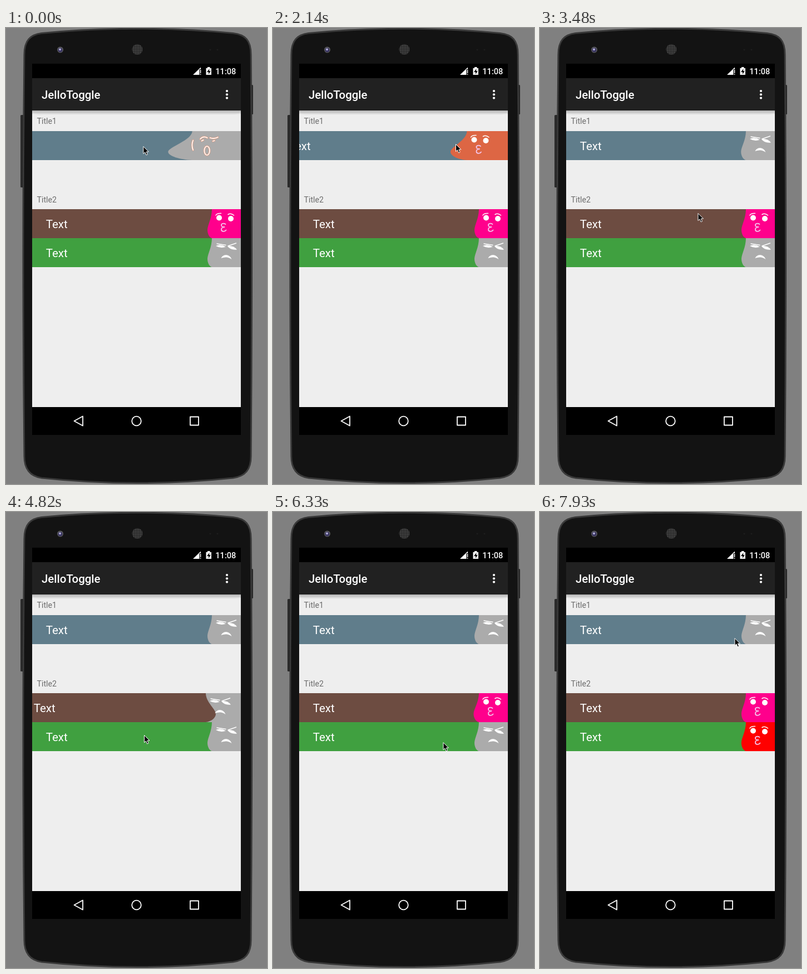
An HTML page for the animation above (8 s loop, 469 by 818 pixels).

```html
<!DOCTYPE html>
<html lang="en">
<head>
<meta charset="utf-8">
<title>JelloToggle</title>
<style>
  html, body { margin: 0; width: 100%; height: 100%; overflow: hidden; background: #808080; }
  svg { display: block; width: 469px; height: 818px; font-family: Roboto, sans-serif; }
  .label { font-size: 14.2px; fill: #6c6c6c; }
  .line { fill: none; stroke: #fff; stroke-linecap: round; stroke-linejoin: round; }
</style>
</head>
<body>
<svg viewBox="0 0 469 818">
  <defs>
    <linearGradient id="shade" x2="0" y2="1">
      <stop offset="0" stop-color="#b8b8b8"/>
      <stop offset=".6" stop-color="#cecece"/>
      <stop offset="1" stop-color="#eee"/>
    </linearGradient>
    <pattern id="mesh" width="3" height="3" patternUnits="userSpaceOnUse">
      <rect width="3" height="3" fill="#222"/>
      <circle cx="1.5" cy="1.5" r="1" fill="#5a5a5a"/>
    </pattern>
    <clipPath id="screen"><rect x="47" y="64" width="375" height="666"/></clipPath>

    <g id="kiss">
      <g fill="#fff">
        <circle cx="383" cy="15.5" r="5"/>
        <circle cx="404" cy="17" r="5"/>
      </g>
      <g class="line" stroke-width="1.5">
        <path d="M377 11Q379 7 386.500 7.500"/>
        <path d="M399 9.500Q404 6.500 409.500 11"/>
      </g>
      <path class="line" stroke="#f3c6ee" style="stroke:#f3c6ee" stroke-width="1.800" d="M394.500 27C391 24.500 386.500 26 387 29C387.300 31.500 390 32 392.500 32C389 32 386.500 34 387 37C387.500 40.500 393 41 395.500 37.500"/>
    </g>
    <g id="angry">
      <g fill="#fff">
        <path d="M377 14Q385 10 395 15.500Q386 19 377 14Z"/>
        <path d="M398 14.500Q408 12.500 415 20.500Q404 22 398 14.500Z"/>
        <path d="M386.500 36C390 28 402 28 405.500 38C399 33 394 33.500 386.500 36Z"/>
      </g>
      <g class="line" stroke-width="1.400">
        <path d="M379 10L395 12.500"/>
        <path d="M399 14L413.500 9"/>
      </g>
    </g>
    <g id="shockLines">
      <path d="M371.500 16.500Q368 25 371.500 34"/>
      <path d="M384.500 14Q390 8 397 12M387 17.500L390 16"/>
      <path d="M402 12Q409 14.500 416 11M407 18L410 17"/>
      <ellipse cx="396.500" cy="35" rx="4.800" ry="8"/>
    </g>
    <g id="shock" fill="none" stroke-linecap="round">
      <use href="#shockLines" stroke="#e59a7c" stroke-width="3.200"/>
      <use href="#shockLines" stroke="#fff" stroke-width="1.700"/>
    </g>
    <path id="body" d="M33 48C33 22 44 12 64 9.500Q236 -7 408 9.500C430 12 440 22 440 48Q443 410 440 768C440 792 430 804 408 807Q236 825 64 807C44 804 33 792 33 768Q29 410 33 48Z"/>
  </defs>

  <rect width="469" height="818" fill="#808080"/>
  <g fill="#2b2b2b">
    <rect x="26" y="156" width="7" height="130" rx="1.500"/>
    <rect x="437" y="102" width="7" height="53" rx="1.500"/>
  </g>
  <use href="#body" fill="#131313" stroke="#2b2b2b" stroke-width="3"/>
  <use href="#body" fill="none" stroke="#444" stroke-width="1.200"/>
  <circle cx="97.500" cy="39" r="5.500" fill="#58585c"/>
  <circle cx="97.500" cy="39.500" r="3.800" fill="#373260"/>
  <circle cx="97" cy="38.500" r="2" fill="#b4b0d8"/>
  <circle cx="236" cy="38.500" r="9.500" fill="url(#mesh)"/>
  <g fill="#1e1e1e"><circle cx="367" cy="39" r="1.500"/><circle cx="380" cy="39" r="1.500"/></g>

  <g clip-path="url(#screen)">
    <rect x="47" y="64" width="375" height="666"/>
    <rect x="47" y="148" width="375" height="532" fill="#eee"/>
    <rect x="47" y="148" width="375" height="7" fill="url(#shade)"/>
    <path fill="none" stroke="#dedede" d="M47 151Q51 154.500 60 154.500H409Q418 154.500 422 151"/>
    <rect x="47" y="90" width="375" height="58" fill="#212121"/>

    <g fill="#fff">
      <path d="M336 84L350 70.500V74H347.500V84Z"/>
      <path d="M348.800 75H350.300V81H348.800ZM348.800 82.500H350.300V84H348.800Z"/>
      <path d="M359.500 72H362V70H366.500V72H369V84H359.500Z"/>
      <path fill="#000" d="M365.500 73L361 79H364V83L367.800 77H365Z"/>
      <text x="376.300" y="83" font-size="14.600" font-weight="500">11:08</text>
      <text x="64" y="127" font-size="20.400" font-weight="500">JelloToggle</text>
      <circle cx="397" cy="113" r="2.100"/>
      <circle cx="397" cy="119.300" r="2.100"/>
      <circle cx="397" cy="125.600" r="2.100"/>
    </g>
    <text class="label" x="55.500" y="172">Title1</text>
    <text class="label" x="55.500" y="313">Title2</text>
    <g id="rows"></g>

    <g class="line" stroke-width="1.800">
      <path d="M122.500 705L138 696.500V713.500Z"/>
      <circle cx="234.500" cy="705" r="8.300"/>
      <rect x="331" y="697.500" width="15" height="15"/>
    </g>
  </g>
  <path id="cursor" stroke="#fff" d="M.5 .5V13.500L3.500 10.800L5.600 15.800L8 14.800L5.900 10H10Z"/>
</svg>

<script>
const LOOP = 8000, TICK = 89.2, ROW_H = 52, MAX_PULL = 86;

const rows = [
  { y: 185, back: '#607d8b', tint: '#dd6644', on: false },
  { y: 325, back: '#6d4c41', tint: '#ff008c', on: true },
  { y: 377, back: '#40a040', tint: '#ff0000', on: false }
];

// Times are in ticks; x, y is the grip; next is where the pointer heads after letting go
const drags = [
  { row: 0, grab: -1.15, release: 7.4, x: 317, y: 212, next: [8, 260.5, 231] },
  { row: 0, grab: 15, release: 26, x: 371, y: 208, cancel: true },
  { row: 0, grab: 28, release: 34, x: 371, y: 212, next: [39, 283.5, 332] },
  { row: 1, grab: 47, release: 54, x: 333, y: 364, next: [54, 248, 400] },
  { row: 1, grab: 61, release: 67.2, x: 355, y: 381, next: [71, 305.5, 413] },
  { row: 2, grab: 75, release: 81.5, x: 340, y: 417, next: [89, 349.5, 226] }
];

const $ = id => document.getElementById(id);
const clamp = v => Math.min(1, Math.max(0, v));
const smooth = v => clamp(v) ** 2 * (3 - 2 * clamp(v));

// [body pull, tip pull] of one drag at tick k
function pullOf(drag, k) {
  const held = k - drag.grab, free = k - drag.release;
  if (held <= 0) return [0, 0];
  if (drag.cancel) {
    const p = MAX_PULL * smooth(held / 6) * smooth(-free / 4);
    return [p, p];
  }
  if (free < 0) {
    const p = MAX_PULL * (1 - Math.exp(-1.5 * held));
    return [p, p];
  }
  // the tip swings to the other side on every tick
  const side = Math.floor(free) % 2 ? 1 : -1;
  return [22 * Math.exp(-1.6 * free), side * 15 * Math.exp(-.6 * free)];
}

const stops = drags.flatMap(d => [
  [d.grab, d.x, d.y],
  [d.release, d.x - pullOf(d, d.release - .001)[0], d.y],
  ...(d.next ? [d.next] : [])
]);

function cursorAt(k) {
  const drag = drags.find(d => k >= d.grab && k < d.release);
  if (drag) return [drag.x - pullOf(drag, k)[0], drag.y];
  const i = stops.findIndex(s => s[0] > k);
  if (i < 0) return stops[stops.length - 1].slice(1);
  const [t0, x0, y0] = stops[i - 1], [t1, x1, y1] = stops[i];
  const p = (k - t0) / (t1 - t0);
  return [x0 + (x1 - x0) * p, y0 + (y1 - y0) * p];
}

function blob(pull, tipPull) {
  const edge = 370 - pull / 2, tip = 362 - tipPull;
  return `M422 0H${edge}C${edge} 16 ${tip} 29 ${tip} 37` +
    `C${tip} 45 ${(edge + tip) / 2} 51 ${edge} ${ROW_H}H422Z`;
}

$('rows').innerHTML = rows.map(r => `<g transform="translate(0 ${r.y})">
  <rect x="47" width="375" height="${ROW_H}" fill="${r.back}"/>
  <text y="34.300" font-size="20.500" fill="#fff">Text</text>
  <path/><use/></g>`).join('');

rows.forEach((r, i) => {
  const g = $('rows').children[i];
  [r.text, r.blob, r.face] = ['text', 'path', 'use'].map(s => g.querySelector(s));
  r.drags = drags.filter(d => d.row === i);
});

function draw(k) {
  for (const r of rows) {
    const drag = r.drags.filter(d => d.grab <= k).pop();
    const [pull, tipPull] = drag ? pullOf(drag, k) : [0, 0];
    const flips = r.drags.filter(d => !d.cancel && d.release <= k).length;
    const on = r.on !== (flips % 2 === 1);
    r.text.setAttribute('x', 71.7 - pull);
    r.blob.setAttribute('d', blob(pull, tipPull));
    r.blob.setAttribute('fill', on ? r.tint : '#ababab');
    r.face.setAttribute('href', pull > 60 ? '#shock' : on ? '#kiss' : '#angry');
    r.face.setAttribute('x', -pull / 2);
  }
  $('cursor').setAttribute('transform', `translate(${cursorAt(k)})`);
}

function loop() {
  const t = performance.now() % LOOP;
  draw(Math.min(89, Math.floor((t + 9) / TICK)));
  requestAnimationFrame(loop);
}
loop();
</script>
</body>
</html>
```
